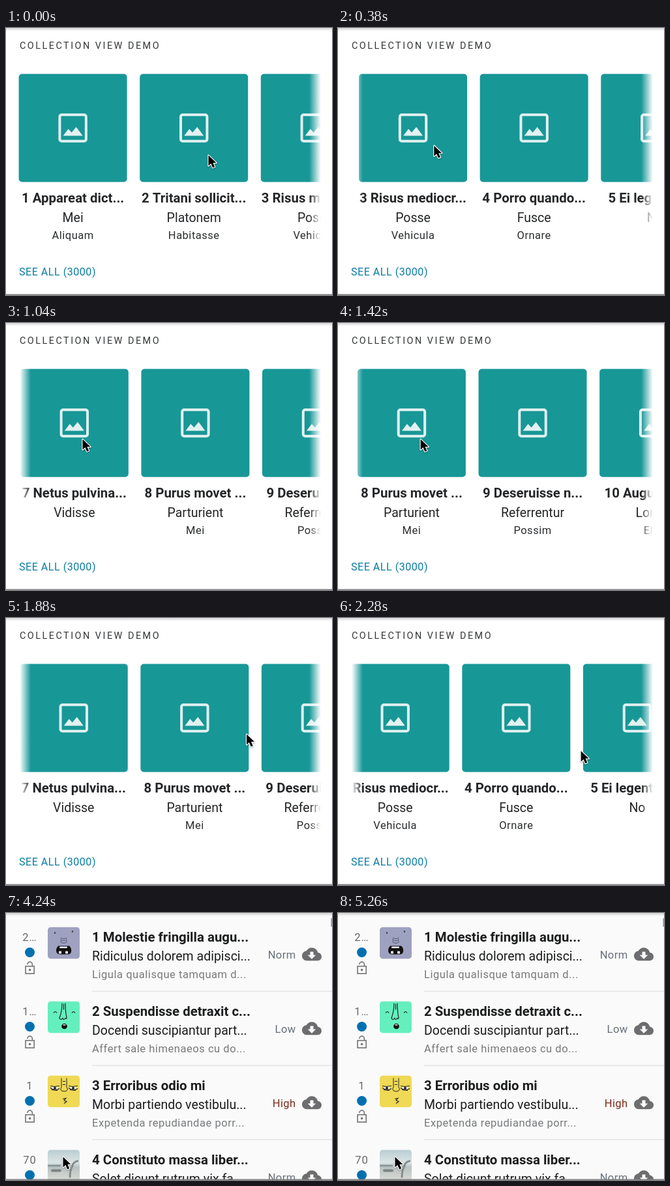
An HTML page with a canvas for the animation above (5.34 s loop, 500 px wide and 410 px high).

```html
<!DOCTYPE html>
<html lang="en">
<head>
<meta charset="utf-8">
<title>Collection view demo</title>
<style>
html, body { margin: 0; width: 100%; height: 100%; overflow: hidden; background: #fff; }
canvas { display: block; width: 500px; height: 410px; }
</style>
</head>
<body>
<canvas id="stage"></canvas>
<script>
const W = 500, H = 410, LOOP = 5340;
const FONT = 'Roboto, "Open Sans", sans-serif';
const BOLD = '700 20.4px ' + FONT;
const BODY = '400 19.5px ' + FONT;
const SMALL = '400 16.5px ' + FONT;
const PITCH = 185.6, CARD = 166;

const canvas = document.getElementById('stage');
const ctx = canvas.getContext('2d');
const dpr = window.devicePixelRatio || 1;
canvas.width = W * dpr;
canvas.height = H * dpr;

const cards = [
  ['1 Appareat dict...', 'Mei', 'Aliquam'],
  ['2 Tritani sollicit...', 'Platonem', 'Habitasse'],
  ['3 Risus mediocr...', 'Posse', 'Vehicula'],
  ['4 Porro quando...', 'Fusce', 'Ornare'],
  ['5 Ei legentur r...', 'No', ''],
  ['6 Mazim eius ta...', 'Dignissim', 'Nostrum'],
  ['7 Netus pulvina...', 'Vidisse', ''],
  ['8 Purus movet ...', 'Parturient', 'Mei'],
  ['9 Deseruisse n...', 'Referrentur', 'Possim'],
  ['10 Augue tacit...', 'Lorem', 'Elitr']
];

const rows = [
  ['2…', '1 Molestie fringilla augu...', 'Ridiculus dolorem adipisci...', 'Ligula qualisque tamquam d...', 'Norm'],
  ['1…', '2 Suspendisse detraxit c...', 'Docendi suscipiantur part...', 'Affert sale himenaeos cu do...', 'Low'],
  ['1', '3 Erroribus odio mi', 'Morbi partiendo vestibulu...', 'Expetenda repudiandae porr...', 'High'],
  ['70', '4 Constituto massa liber...', 'Solet dicunt rutrum vix fa...', '', 'Norm']
];

const xKeys = [[0, 310], [120, 245], [250, 160], [340, 147], [700, 146], [1040, 117], [1680, 142],
  [1780, 220], [1880, 368], [1950, 392], [2200, 392], [2500, 230], [2700, 105], [2900, 88], [3050, 87]];
const yKeys = [[0, 195], [250, 181], [700, 179], [1040, 178], [1880, 178],
  [2200, 186], [2500, 310], [2700, 388], [2900, 378], [3050, 374]];

const cloud = new Path2D('M19.35 10.04C18.67 6.59 15.64 4 12 4 9.11 4 6.6 5.64 5.35 8.04 2.34 8.36 0 10.91 0 14c0 3.31 2.69 6 6 6h13c2.76 0 5-2.24 5-5 0-2.64-2.05-4.78-4.65-4.96z');
const arrow = new Path2D('M17 13l-5 5-5-5h3V9h4v4z');
const pointer = new Path2D('M0 0V17.5L4.2 13.7L7.2 20.6L10.5 19.2L7.5 12.5H13Z');
const shackle = new Path2D('M7.95 6a4.05 4.05 0 0 1 8.1 0v3');

const clamp = v => Math.max(0, Math.min(1, v));
const easeOut = v => 1 - Math.pow(1 - clamp(v), 3);
const fling = v => 1 - Math.pow(1 - clamp(v), 2.36);

// Monotone cubic interpolation through [time, value] keys
function track(keys, t) {
  const n = keys.length - 1;
  if (t >= keys[n][0]) return keys[n][1];
  let i = 0;
  while (t >= keys[i + 1][0]) i++;
  const slope = k => (keys[k + 1][1] - keys[k][1]) / (keys[k + 1][0] - keys[k][0]);
  const tangent = k => {
    if (k === 0 || k === n) return 0;
    const a = slope(k - 1), b = slope(k);
    return a * b <= 0 ? 0 : 2 * a * b / (a + b);
  };
  const [t0, v0] = keys[i], [t1, v1] = keys[i + 1];
  const d = t1 - t0, u = (t - t0) / d, r = 1 - u;
  return v0 * (1 + 2 * u) * r * r + tangent(i) * d * u * r * r
    + v1 * u * u * (3 - 2 * u) - tangent(i + 1) * d * u * u * r;
}

// Drag left, fling, drag right, fling back to the first card
function scrollAt(t) {
  const x = track(xKeys, t);
  if (t < 250) return Math.max(0, 292 - x);
  if (t < 1680) return 132 + 1198 * fling((t - 250) / 1540);
  if (t < 1880) return scrollAt(1679) - Math.max(0, x - 156);
  return Math.max(0, 1114.6 - 1550 * fling((t - 1880) / 1700));
}

function text(str, x, y, font, color, align = 'left', spacing = 0) {
  ctx.font = font;
  ctx.fillStyle = color;
  ctx.textAlign = align;
  ctx.letterSpacing = spacing + 'px';
  ctx.fillText(str, x, y);
}

function box(x, y, w, h, r, color) {
  ctx.fillStyle = color;
  ctx.beginPath();
  ctx.roundRect(x, y, w, h, r);
  ctx.fill();
}

function disc(x, y, r, color) {
  ctx.fillStyle = color;
  ctx.beginPath();
  ctx.arc(x, y, r, 0, 7);
  ctx.fill();
}

function line(d, width = 1.2, color = '#222') {
  ctx.strokeStyle = color;
  ctx.lineWidth = width;
  ctx.stroke(new Path2D(d));
}

function fade(x, solid, clear) {
  const g = ctx.createLinearGradient(solid, 0, clear, 0);
  g.addColorStop(0, '#fff');
  g.addColorStop(1, 'rgba(255,255,255,0)');
  ctx.fillStyle = g;
  ctx.fillRect(x, 60, 20, 275);
}

function drawCard([title, name, note], x) {
  box(x, 70.5, CARD, CARD, 5, '#189797');
  ctx.save();
  ctx.translate(x + CARD / 2, 153.5);
  ctx.strokeStyle = '#e2f1f1';
  ctx.lineWidth = 4;
  ctx.beginPath();
  ctx.roundRect(-20.2, -20.2, 40.4, 40.4, 3);
  ctx.stroke();
  ctx.fillStyle = '#e2f1f1';
  ctx.fill(new Path2D('M-15 12L-7 1.5L-2 7L5 -1.5L15 12Z'));
  ctx.restore();
  const mid = x + CARD / 2;
  text(title, mid, 267.5, BOLD, '#242628', 'center');
  text(name, mid, 297.5, BODY, '#242628', 'center');
  text(note, mid, 323.5, SMALL, '#2a2c2e', 'center', 0.5);
}

function drawCarousel(scroll) {
  ctx.fillStyle = '#fff';
  ctx.fillRect(0, 0, W, H);
  text('COLLECTION VIEW DEMO', 21, 32, '400 14.4px ' + FONT, '#333537', 'left', 2.5);
  ctx.save();
  ctx.beginPath();
  ctx.rect(18, 60, 466, 280);
  ctx.clip();
  cards.forEach((card, i) => {
    const x = 19.6 + i * PITCH - scroll;
    if (x > -CARD - 20 && x < W) drawCard(card, x);
  });
  fade(464, 483, 465);
  ctx.globalAlpha = clamp(scroll / 18);
  fade(18, 21, 38);
  ctx.restore();
  text('SEE ALL (3000)', 20, 379.5, '400 16px ' + FONT, '#0a7ca5', 'left', 0.55);
}

const faces = [
  () => {
    box(0, 0, 49, 49, 0, '#9fa1c1');
    disc(11, 9, 1.2, '#333');
    disc(38, 7, 1.2, '#333');
    line('M20 24l1-8M29 24l-1-8M21 24q4 2 7 0', 1, '#55576f');
    line('M22 18h5M22 21h5', 1, '#55576f');
    ctx.fillStyle = '#111';
    ctx.fill(new Path2D('M16 29h17q4 4 3 9q-1 4-5 4H18q-5-1-5-6q0-4 3-7Z'));
    box(18, 30, 12, 2.5, 1, '#f0f0f4');
    box(17, 37, 4, 4, 1, '#f0f0f4');
    box(27, 37, 4, 4, 1, '#f0f0f4');
  },
  () => {
    box(0, 0, 49, 49, 0, '#65efbf');
    line('M22 3q0 12-4 23q2 4 5 0q1 4 4 0q2 2 2-1q-2-9-2-22M24.5 4v9');
    line('M9 18q2.5-4 5 0M37 18q2.5-4 5 0');
    disc(25.5, 38.5, 4.3, '#111');
    box(23.5, 35.5, 4, 1.5, 0.5, '#fff');
  },
  () => {
    box(0, 0, 49, 49, 0, '#efd955');
    for (const x of [11, 39]) {
      box(x - 5, 17, 10, 5, 2, '#f5f0d8');
      disc(x, 19.5, 2, '#222');
      line(`M${x - 7} 16l6 1l8-1M${x - 7} 19q7 6 14 1M${x - 5} 22l9 1`, 1.2);
    }
    line('M21 4v14q-3 5 2 6q3 1 5 0q4-2 1-6V4M23 9h4M23 14h4', 1);
    line('M23 36l5-1l-3 3l4 2l-4 3', 1.1);
  },
  () => {
    const g = ctx.createLinearGradient(0, 0, 0, 49);
    g.addColorStop(0, '#b9cdd2');
    g.addColorStop(0.4, '#dbe4e4');
    g.addColorStop(0.55, '#b9c2c1');
    g.addColorStop(1, '#dcdcd7');
    ctx.fillStyle = g;
    ctx.fillRect(0, 0, 49, 49);
    box(0, 23, 20, 3, 1, '#8a9799');
    box(5, 30, 16, 4, 2, '#7a8482');
    line('M47 17q-9 2-9 8q-4 6-4 18', 3, '#868d8c');
  }
];

function drawRow([count, title, name, note, level], i, avatars) {
  ctx.save();
  ctx.translate(0, i * 114);
  text(count, 36.5, 43, SMALL, '#65686b', 'center', 1);
  disc(36.5, 60.5, 7.5, '#0070b1');

  ctx.save();
  ctx.translate(25.3, 73.3);
  ctx.scale(0.94, 0.94);
  ctx.strokeStyle = '#77797b';
  ctx.lineWidth = 1.8;
  ctx.strokeRect(5, 9, 14, 12);
  ctx.stroke(shackle);
  disc(12, 15, 1.9, '#77797b');
  ctx.restore();

  ctx.save();
  ctx.translate(64, 21.5);
  ctx.beginPath();
  ctx.roundRect(0, 0, 49, 49, 5);
  ctx.clip();
  ctx.globalAlpha *= avatars;
  faces[i]();
  ctx.restore();

  text(title, 132, 43.5, BOLD, '#1c1d1e');
  text(name, 132, 73, BODY, '#1c1d1e');
  text(note, 132, 99.5, SMALL, '#77797b', 'left', 0.55);
  text(level, 444.5, 70, SMALL, level === 'High' ? '#7c2a1a' : '#67707a', 'right', 0.4);

  ctx.save();
  ctx.translate(454, 48.3);
  ctx.scale(1.25, 1.25);
  ctx.fillStyle = '#6d6d6f';
  ctx.fill(cloud);
  ctx.fillStyle = '#fafafa';
  ctx.fill(arrow);
  ctx.restore();

  ctx.fillStyle = '#dfdfdf';
  ctx.fillRect(132, 119.5, 368, 1.2);
  ctx.restore();
}

function drawList(t) {
  const shown = easeOut((t - 3560) / 400);
  if (shown <= 0) return;
  ctx.save();
  ctx.globalAlpha = shown;
  ctx.fillStyle = '#fafafa';
  ctx.fillRect(0, 0, W, H);
  ctx.translate(0, (1 - shown) * 36);
  rows.forEach((row, i) => drawRow(row, i, clamp((t - 3860) / 200)));
  ctx.fillStyle = '#8f9193';
  ctx.fillRect(498.5, 8, 1.5, 13);
  ctx.restore();
}

function drawFrame() {
  const g = ctx.createLinearGradient(0, 0, 0, 5);
  g.addColorStop(0, 'rgba(0,0,0,0.16)');
  g.addColorStop(1, 'rgba(0,0,0,0)');
  ctx.fillStyle = g;
  ctx.fillRect(0, 0, W, 5);
  ctx.fillStyle = '#808080';
  ctx.fillRect(0, 408.6, W, 1.4);
}

function drawPointer(t) {
  ctx.save();
  ctx.translate(track(xKeys, t) + 0.5, track(yKeys, t) + 0.5);
  ctx.scale(0.92, 0.92);
  ctx.shadowColor = 'rgba(0,0,0,0.35)';
  ctx.shadowBlur = 2 * dpr;
  ctx.shadowOffsetY = dpr;
  ctx.strokeStyle = '#fff';
  ctx.lineWidth = 2.6;
  ctx.lineJoin = 'round';
  ctx.stroke(pointer);
  ctx.shadowColor = 'transparent';
  ctx.fillStyle = '#000';
  ctx.fill(pointer);
  ctx.restore();
}

function draw(t) {
  ctx.setTransform(dpr, 0, 0, dpr, 0, 0);
  if (t < 3960) drawCarousel(scrollAt(t));
  drawList(t);
  drawFrame();
  drawPointer(t);
}

const start = performance.now();
function tick() {
  draw((performance.now() - start) % LOOP);
  requestAnimationFrame(tick);
}
tick();
</script>
</body>
</html>
```
